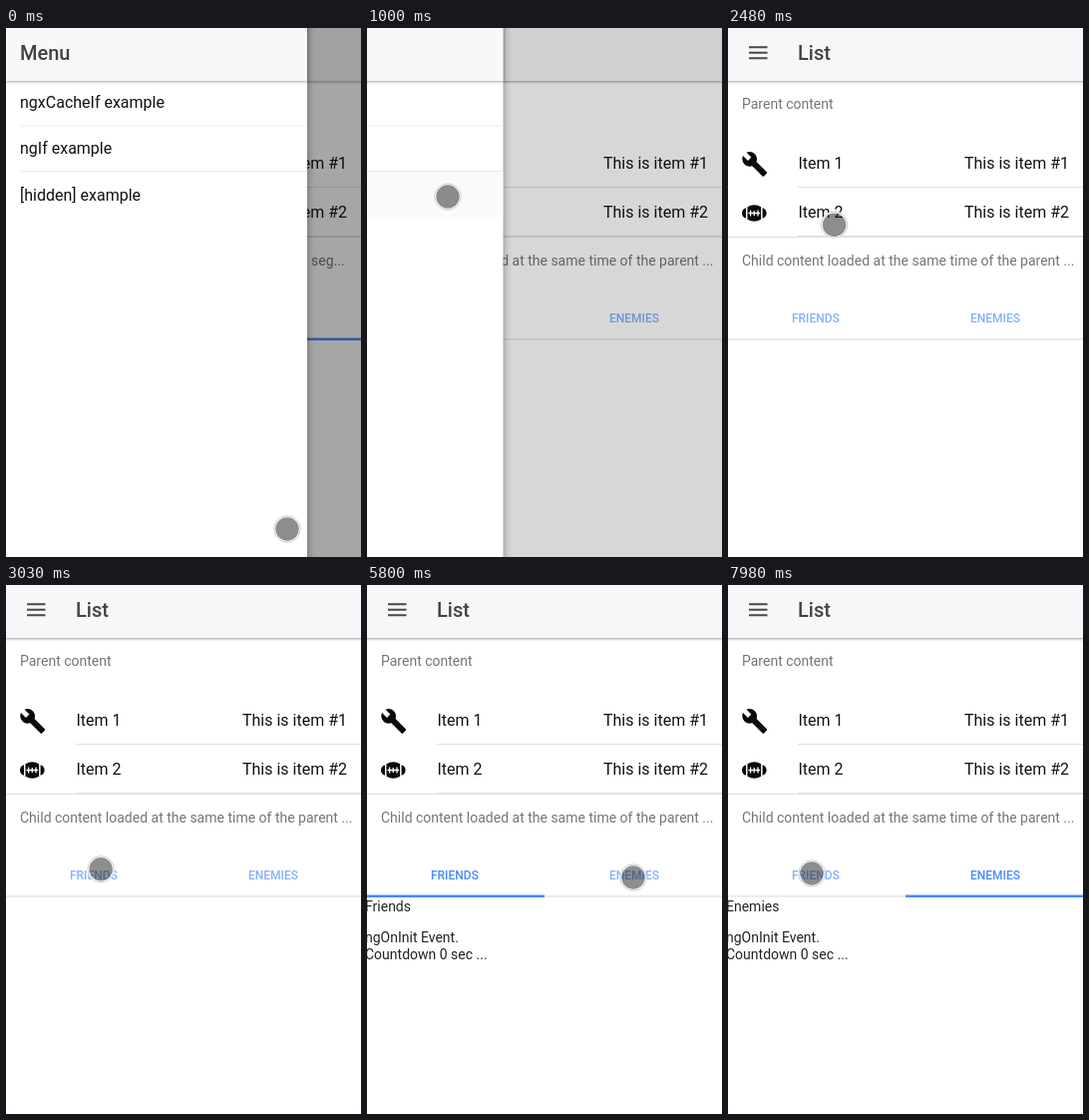
An HTML page that plays this animation: 356x530 px, repeating every 8 s.

```html
<!DOCTYPE html>
<html lang="en">
<head>
<meta charset="utf-8">
<title>List</title>
<style>
  html, body { margin: 0; width: 100%; height: 100%; overflow: hidden; background: #fff; }
  svg { display: block; width: 356px; height: 530px; font-family: Roboto, sans-serif; white-space: pre; }
  .title { font-size: 20px; font-weight: 500; fill: #424242; }
  .item { font-size: 16px; fill: #111; }
  .note { font-size: 14px; fill: #757575; }
  .tab { font-size: 12px; font-weight: 500; fill: #488aff; }
  .body { font-size: 14px; fill: #222; }
  .rule { fill: #e0e0e0; }
  .bar { filter: drop-shadow(0 1px 1.5px rgba(0, 0, 0, .38)); }
</style>
</head>
<body>
<svg viewBox="0 0 356 530">
  <defs>
    <clipPath id="row"><rect y="144" width="302" height="45.5"/></clipPath>
  </defs>

  <g id="page">
    <rect width="356" height="530" fill="#fff"/>
    <rect class="bar" x="-5" y="-5" width="366" height="58" fill="#f7f7f9"/>
    <path d="M21 19.2h18.5M21 24.7h18.5M21 30.2h18.5" stroke="#484848" stroke-width="2"/>
    <text class="title" x="70" y="32">List</text>

    <text class="note" x="14" y="81">Parent content</text>
    <text class="item" x="70.5" y="141">Item 1</text>
    <text class="item" x="237" y="141">This is item #1</text>
    <text class="item" x="70.5" y="190">Item 2</text>
    <text class="item" x="237" y="190">This is item #2</text>
    <rect class="rule" x="70" y="159" width="286" height="1"/>
    <rect class="rule" x="70" y="208" width="286" height="1"/>
    <rect class="rule" y="209" width="356" height="1"/>

    <path transform="translate(13.2 122.8) scale(1.13)" fill="#0a0a0a" d="M22.7 19l-9.1-9.1c.9-2.3.4-5-1.5-6.9-2-2-5-2.4-7.4-1.3L9 6 6 9 1.6 4.7C.4 7.1.9 10.1 2.9 12.1c1.9 1.9 4.6 2.4 6.9 1.5l9.1 9.1c.4.4 1 .4 1.4 0l2.3-2.3c.5-.4.5-1.1.1-1.4z"/>
    <path fill="#0a0a0a" d="M19.5 179.2Q26.3 175.4 33.1 179.2V191.800Q26.300 195.600 19.500 191.800ZM18 180.300V190.700Q14 189.500 14 185.500T18 180.300ZM34.600 180.300V190.700Q38.600 189.500 38.600 185.500T34.600 180.300Z"/>
    <path d="M20.500 185.500h11.600M22.600 182.500v6M26.300 183v5M30 182.500v6" stroke="#fff" stroke-width="1.3"/>

    <text class="note" id="child" x="14" y="238">Child content loaded at the same time of the parent ...</text>
    <text class="note" id="child2" x="306" y="238">seg...</text>

    <rect y="311" width="356" height="1.700" fill="#e8e8e8"/>
    <text class="tab" id="tab0" x="64" y="295">FRIENDS</text>
    <text class="tab" id="tab1" x="243" y="295">ENEMIES</text>
    <rect id="line0" y="310.500" width="178" height="2.500" fill="#488aff"/>
    <rect id="line1" x="178" y="310.500" width="178" height="2.500" fill="#488aff"/>

    <g id="content" class="body">
      <text id="name" x="-2" y="327"></text>
      <text x="-2" y="358">ngOnInit Event.</text>
      <text id="count" x="-2" y="375"></text>
    </g>
  </g>

  <rect id="shade" width="356" height="530"/>

  <g id="menu">
    <rect y="-10" width="302" height="550" fill="#fff" style="filter: drop-shadow(0 0 4px rgba(0, 0, 0, .4))"/>
    <rect class="bar" y="-5" width="302" height="58" fill="#f8f8f8"/>
    <text class="title" x="14" y="32">Menu</text>
    <rect x="14" y="97.500" width="288" height="1" fill="#ebebeb"/>
    <rect x="14" y="143" width="288" height="1" fill="#ebebeb"/>
    <g id="press" clip-path="url(#row)">
      <rect y="144" width="302" height="46" fill="#fafafa"/>
      <circle id="ripple" cx="79" cy="168" fill="#000" fill-opacity=".15"/>
    </g>
    <text class="item" x="14" y="80" fill="#222">ngxCacheIf example</text>
    <text class="item" x="14" y="126">ngIf example</text>
    <text class="item" x="14" y="173">[hidden] example</text>
  </g>

  <g id="cursor">
    <circle r="12.600" fill="none" stroke="#fff" stroke-width="2.200"/>
    <circle r="13.200" fill="none" stroke="#aaa" stroke-width=".6"/>
    <circle r="11.700" fill="#1c1c1c" fill-opacity=".5"/>
  </g>
</svg>
<script>
const LOOP = 8000;
const $ = id => document.getElementById(id);
const clamp = v => Math.min(1, Math.max(0, v));
const smooth = v => v * v * (3 - 2 * v);

// begin, end, steps, control point, target, skew of the easing
const moves = [
  [70, 690, 9, 175, 340, 79, 167, 1],
  [840, 840, 1, 81, 169, 81, 169, 1],
  [2480, 3170, 10, 162, 245, 90, 288, .55],
  [3400, 3400, 1, 87, 290, 87, 290, 1],
  [4010, 4710, 10, 180, 292, 267, 296, 2.1],
  [5040, 5040, 1, 267, 293, 267, 293, 1],
  [6960, 7580, 9, 170, 280, 82, 288, 1],
  [7890, 7980, 2, 83, 288, 84, 289, 1]
];

function pointer(t) {
  let x = 282, y = 502;
  for (const [begin, end, steps, cx, cy, tx, ty, skew] of moves) {
    if (t < begin) break;
    const n = steps > 1 ? Math.floor((t - begin) * (steps - 1) / (end - begin) + .01) + 1 : 1;
    const u = smooth(clamp(n / steps) ** skew), v = 1 - u;
    x = v * v * x + 2 * u * v * cx + u * u * tx;
    y = v * v * y + 2 * u * v * cy + u * u * ty;
  }
  return [x, y];
}

const show = (id, on) => { $(id).style.display = on ? "" : "none"; };
const place = (id, x, y) => $(id).setAttribute("transform", `translate(${x} ${y})`);

function drawMenu(t) {
  const tick = 840 + Math.floor((t - 840) / 77.5 + .03) * 77.5;
  const shut = smooth(clamp((tick - 862) / 250));
  place("menu", -302 * shut, 0);
  show("menu", shut < 1);
  $("shade").setAttribute("opacity", .35 * (1 - shut));
  show("press", t >= 840);
  $("ripple").setAttribute("r", Math.max(0, 12 + (tick - 840) * .22));
}

function drawTabs(t) {
  const swap = clamp((t - 6530) / 110);
  const active = [
    clamp((t - 3500) / 100) * (1 - swap),
    t < 900 ? 1 : swap
  ];
  active.forEach((a, i) => {
    $("line" + i).setAttribute("opacity", a);
    $("tab" + i).setAttribute("opacity", .67 + .33 * a);
  });
  show("child", t >= 900);
  show("child2", t < 900);
  show("content", t >= 3630);
  $("name").textContent = t < 6570 ? "Friends" : "Enemies";
  const left = 3 - [3780, 4790, 5800].filter(s => t >= s).length;
  $("count").textContent = `Countdown ${left} sec ...`;
}

function draw(now) {
  const t = now % LOOP;
  drawMenu(t);
  drawTabs(t);
  place("cursor", ...pointer(t));
  requestAnimationFrame(draw);
}

let start;
requestAnimationFrame(function first(now) {
  start = now;
  draw(0);
});
const baseDraw = draw;
draw = now => baseDraw(now - (start || 0) < 0 ? 0 : now === 0 ? 0 : now - start);
</script>
</body>
</html>
```
